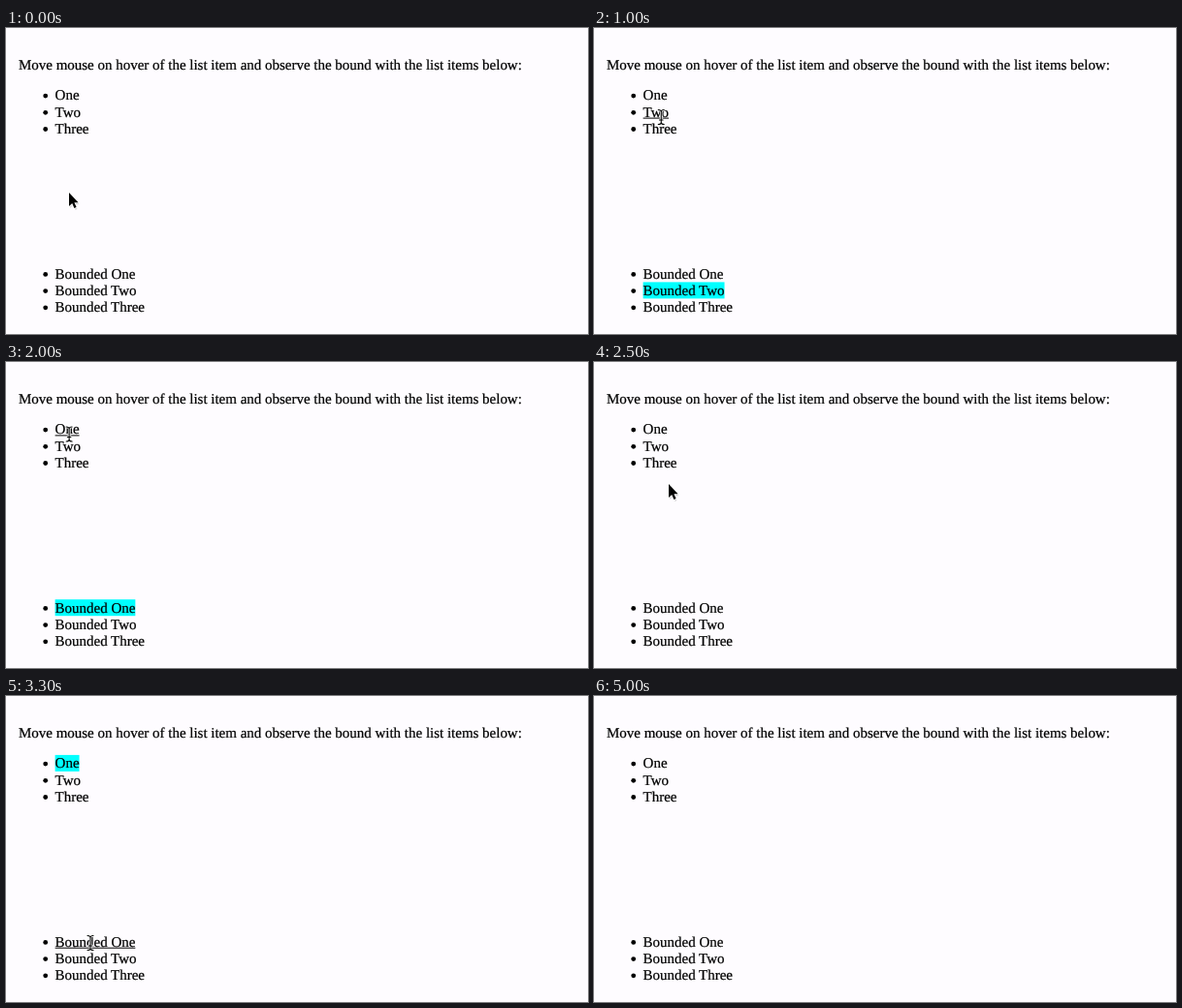
An HTML page for the animation above (5300 ms loop, 600x316 px).

```html
<!DOCTYPE html>
<html lang="en">
<head>
<meta charset="utf-8">
<title>Bound lists</title>
<style>
  html, body { margin: 0; width: 100%; height: 100%; overflow: hidden; background: #fefcff; }
  svg { display: block; }
  text {
    font: 14.97px "Liberation Serif", Times, serif;
    text-rendering: geometricPrecision;
    stroke: #000; stroke-width: .22px;
  }
  #beam { fill: none; stroke-linecap: round; }
</style>
</head>
<body>
<svg width="600" height="316" viewBox="0 0 600 316">
  <defs>
    <path id="beamShape" d="M-3 -7.5Q0 -7.5 0 -5.5Q0 -7.5 3 -7.5M0 -5.5V5.5M-3 7.5Q0 7.5 0 5.5Q0 7.5 3 7.5M-1.8 3H1.8"/>
    <path id="arrowShape" d="M0 0V14L3.2 11.1L5.4 16L7.6 15L5.4 10.2H9.6Z"/>
  </defs>
  <text x="13" y="42.6">Move mouse on hover of the list item and observe the bound with the list items below:</text>
  <g id="lists"></g>
  <g id="arrow">
    <use href="#arrowShape" x="1" y="2" opacity=".14"/>
    <use href="#arrowShape" stroke="#fff" stroke-width="1.6" paint-order="stroke"/>
  </g>
  <g id="beam">
    <use href="#beamShape" stroke="#fff" stroke-width="2.4"/>
    <use href="#beamShape" stroke="#000" stroke-width="1.1"/>
  </g>
</svg>
<script>
const LOOP = 5300, STEP = 100, GONE = 4900, ROW = 17.2, LEFT = 50.6;
const byId = id => document.getElementById(id);
const lists = byId('lists'), arrow = byId('arrow'), beam = byId('beam');

function add(tag, attrs) {
  const el = document.createElementNS('http://www.w3.org/2000/svg', tag);
  for (const name in attrs) el.setAttribute(name, attrs[name]);
  return lists.appendChild(el);
}

function makeItem(label, baseline) {
  const top = baseline - 13.5;
  const box = add('rect', { x: LEFT, y: top, height: 17, fill: '#0ff' });
  add('circle', { cx: 40.7, cy: baseline - 4.3, r: 2.4 });
  const text = add('text', { x: LEFT, y: baseline });
  text.textContent = label;
  const width = text.getComputedTextLength();
  const line = add('rect', { x: LEFT, y: baseline + 1, width, height: 1 });
  box.setAttribute('width', width);
  return { box, line, top, right: LEFT + width };
}

const names = ['One', 'Two', 'Three'];
const upper = names.map((name, i) => makeItem(name, 74.4 + i * ROW));
const lower = names.map((name, i) => makeItem('Bounded ' + name, 258.7 + i * ROW));
const items = [...upper, ...lower];

// Each move eases from the last resting place: begin, end, x, y
const moves = [
  [100, 600, 73, 104],
  [800, 1200, 68, 88],
  [1300, 1900, 64, 74],
  [1900, 2200, 66, 75],
  [2300, 2400, 69, 88],
  [2400, 2500, 77, 126],
  [2500, 2700, 80, 150],
  [2800, 3300, 87, 255],
  [3500, 4000, 84.5, 284],
  [4100, 4200, 100, 272],
  [4200, 4300, 166, 254]
];

function pointerAt(t) {
  let x = 65, y = 170;
  for (const [begin, end, toX, toY] of moves) {
    const left = 1 - Math.min(1, Math.max(0, (t - begin) / (end - begin)));
    const k = 1 - left * left;
    x += (toX - x) * k;
    y += (toY - y) * k;
  }
  return [x, y];
}

const show = (el, on) => el.style.display = on ? '' : 'none';

function draw(now) {
  const t = Math.floor(now % LOOP / STEP) * STEP;
  const [x, y] = pointerAt(t);
  const visible = t < GONE;
  const hit = visible ? items.findIndex(item =>
    x >= LEFT && x <= item.right && y >= item.top && y < item.top + ROW) : -1;

  items.forEach((item, i) => {
    show(item.line, i === hit);
    show(item.box, hit >= 0 && i === (hit + names.length) % items.length);
  });
  for (const cursor of [arrow, beam]) cursor.setAttribute('transform', `translate(${x} ${y})`);
  show(arrow, visible && hit < 0);
  show(beam, hit >= 0);
}

let start;
function tick(now) {
  start ??= now;
  draw(now - start);
  requestAnimationFrame(tick);
}
draw(0);
requestAnimationFrame(tick);
</script>
</body>
</html>
```
